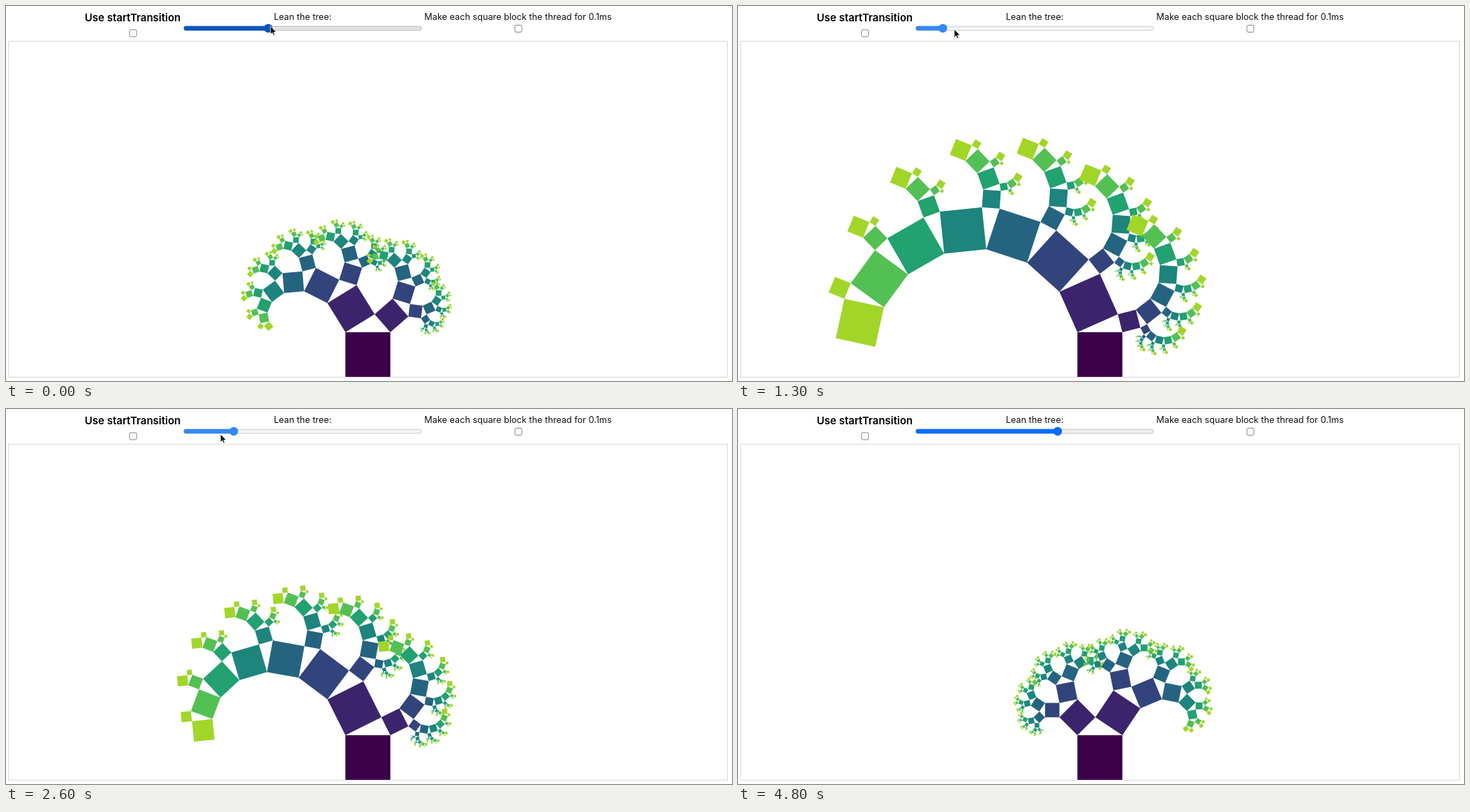
Write an HTML page with a canvas that moves like this. It is 1040 px wide and 538 px high and loops after 4.9 s.

```html
<!DOCTYPE html>
<html lang="en">
<head>
<meta charset="utf-8">
<title>Lean the tree</title>
<style>
  html, body { margin: 0; width: 100%; height: 100%; overflow: hidden; background: #fff; }
  canvas, svg { position: absolute; left: 0; top: 0; width: 1040px; height: 538px; }
  text { font: 12.7px Inter, "Noto Sans", sans-serif; fill: #111; text-anchor: middle; }
  .title { font-size: 15px; font-weight: 600; fill: #000; }
  .box { fill: #fff; stroke: #767676; stroke-width: .9; }
</style>
</head>
<body>
<canvas id="tree"></canvas>
<svg viewBox="0 0 1040 538">
  <rect x="3.5" y="50.5" width="1030" height="482" fill="none" stroke="#d8d8d8"/>
  <text class="title" x="181.5" y="22.4">Use startTransition</text>
  <text x="425" y="20">Lean the tree:</text>
  <text x="733.5" y="20">Make each square block the thread for 0.1ms</text>
  <rect class="box" x="177" y="34" width="10" height="10" rx="2"/>
  <rect class="box" x="729" y="27.5" width="10" height="10" rx="2"/>
  <rect id="track" x="255" y="29.2" width="340" height="5.8" rx="2.9" stroke-width=".8"/>
  <rect id="fill" x="254.6" y="28.8" height="6.5" rx="3.2"/>
  <circle id="thumb" cy="32" r="6.2"/>
  <path id="cursor" d="M0 0V11.6L2.6 9.2L4.4 13.2L6.2 12.4L4.5 8.5H8.2Z" stroke="#fff" stroke-width=".8"/>
</svg>
<script>
const STEP = 100, STEPS = 49, SCALE = 0.8047, TRUNK = 80, HEIGHT = 0.4, DEPTH = 8;
const COLORS = ['#3b0049', '#3b246b', '#32447c', '#256480', '#1d847e', '#22a171', '#53c054', '#a1d629'];

// Slider value in hundredths, one per step; the last one stays.
const LEANS = [
  -15, -10, 0, 15, 25, 10, -15, -30, 0, 40, 35, 0, -25, -40, -30, -10, 25, 40, 45,
  50, 50, 45, 35, 20, 0, -15, -30, -40, -45, -30, -10, 15, 45, 10, -40, 0, 40, 10
];
const LAST = LEANS.length - 1;

// How far the pointer runs ahead of the slider, where it is not half a step.
const LEAD = { 0: 0.2, 10: 0.95, 26: 0.58, 31: 0.13 };

const POINTER_Y = [[0, 29], [10, 33], [17, 34], [26, 36], [31, 33], [37, 30], [39, 14], [42, 9], [47, 393]];
const EXIT_X = [[37, 452], [39, 455], [42, 453], [47, 728]];

const STATES = {
  idle: { accent: '#0a6dfa', track: '#efefef', edge: '#b2b2b2' },
  hover: { accent: '#0b55c0', track: '#e3e3e3', edge: '#aaaaaa' },
  active: { accent: '#3788f8', track: '#f4f4f4', edge: '#c2c2c2' }
};

const $ = id => document.getElementById(id);
const set = (id, attrs) => {
  for (const k in attrs) $(id).setAttribute(k, attrs[k]);
};
const mix = (a, b, k) => a + (b - a) * k;

function along(keys, t) {
  const i = keys.findIndex(k => k[0] >= t);
  if (i <= 0) return keys.at(i)[1];
  const [t0, a] = keys[i - 1], [t1, b] = keys[i];
  return mix(a, b, (t - t0) / (t1 - t0));
}

const canvas = $('tree'), ctx = canvas.getContext('2d');
const dpr = window.devicePixelRatio || 1;
canvas.width = 1040 * dpr;
canvas.height = 538 * dpr;

// Draws a square with its bottom left corner at the local origin.
function branch(w, level, shape) {
  if (level >= DEPTH || w < 1) return;
  ctx.fillStyle = COLORS[level];
  ctx.fillRect(0, -w, w, w);

  ctx.save();
  ctx.translate(0, -w);
  ctx.rotate(-shape.leftTurn);
  branch(w * shape.left, level + 1, shape);
  ctx.restore();

  ctx.save();
  ctx.translate(w, -w);
  ctx.rotate(shape.rightTurn);
  ctx.translate(-w * shape.right, 0);
  branch(w * shape.right, level + 1, shape);
  ctx.restore();
}

function drawTree(lean) {
  const a = 0.5 - lean, b = 0.5 + lean;
  ctx.setTransform(dpr, 0, 0, dpr, 0, 0);
  ctx.clearRect(0, 0, 1040, 538);
  ctx.save();
  ctx.beginPath();
  ctx.rect(4, 51, 1029, 481);
  ctx.clip();
  ctx.translate(486.2, 532.4);
  ctx.scale(SCALE, SCALE);
  branch(TRUNK, 0, {
    left: Math.hypot(HEIGHT, a), leftTurn: Math.atan2(HEIGHT, a),
    right: Math.hypot(HEIGHT, b), rightTurn: Math.atan2(HEIGHT, b)
  });
  ctx.restore();
}

const leanAt = i => LEANS[Math.min(i, LAST)] / 100;
const thumbX = lean => 425 + lean * 329;

function pointerX(i) {
  if (i >= LAST) return along(EXIT_X, i);
  return mix(thumbX(leanAt(i)), thumbX(leanAt(i + 1)), LEAD[i] ?? 0.5);
}

function stateAt(i) {
  if (i === 0 || i === LAST + 1) return STATES.hover;
  return i <= LAST ? STATES.active : STATES.idle;
}

function draw(i) {
  const lean = leanAt(i), x = thumbX(lean), state = stateAt(i);
  drawTree(lean);
  set('track', { fill: state.track, stroke: state.edge });
  set('fill', { width: x - 254.6, fill: state.accent });
  set('thumb', { cx: x, fill: state.accent });
  set('cursor', {
    transform: `translate(${pointerX(i)} ${along(POINTER_Y, i)})`,
    visibility: i === STEPS - 1 ? 'hidden' : 'visible'
  });
}

let start, shown = -1;
function tick(now) {
  start ??= now;
  const i = Math.floor((now - start) / STEP) % STEPS;
  if (i !== shown) draw(shown = i);
  requestAnimationFrame(tick);
}
draw(0);
requestAnimationFrame(tick);
</script>
</body>
</html>
```
